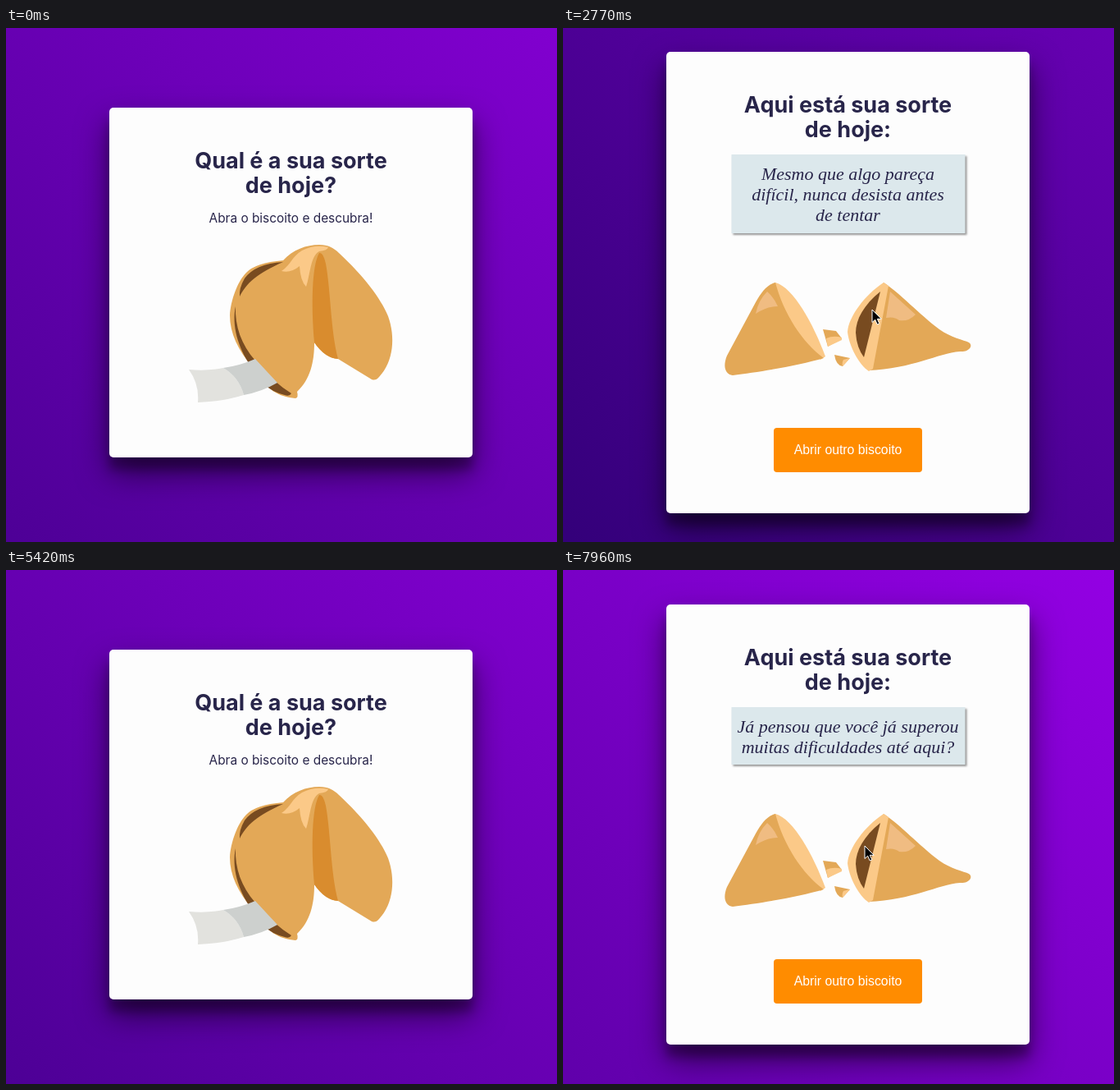
An HTML page that plays this animation: 672 px wide and 626 px high, repeating every 8 s.

```html
<!DOCTYPE html>
<html lang="pt-BR">
<head>
<meta charset="utf-8">
<title>Biscoito da sorte</title>
<style>
  html, body { margin: 0; width: 100%; height: 100%; overflow: hidden; }
  #stage { position: relative; width: 672px; height: 626px; overflow: hidden; }
  #card {
    position: absolute; left: 126px; width: 443px; border-radius: 5px; background: #fdfdfd;
    box-shadow: 0 19px 38px rgba(0,0,0,.54), 0 15px 12px rgba(0,0,0,.28);
  }
  svg { position: absolute; left: 0; top: 0; }
  text { text-anchor: middle; fill: #28254a; }
  .title { font: 700 27px Inter, sans-serif; }
  .sub { font: 15.4px Inter, sans-serif; }
  .fortune { font: italic 22px "Liberation Serif", serif; }
  .label { font: 15.8px "Liberation Sans", Arial, sans-serif; fill: #fff; }
  #note { fill: #dce8ec; filter: drop-shadow(2px 2px 1px rgba(0,0,0,.4)); }
  .tan { fill: #e3a857; }
  .light { fill: #fbc988; }
  .shine { fill: #f0bc82; }
  .brown { fill: #784b20; }
</style>
</head>
<body>
<div id="stage">
  <div id="card"></div>
  <svg width="672" height="626" viewBox="0 0 672 626">
    <g id="closed">
      <text class="title" x="347.5" y="171">Qual é a sua sorte</text>
      <text class="title" x="347.5" y="201">de hoje?</text>
      <text class="sub" x="347.5" y="237">Abra o biscoito e descubra!</text>
      <g id="cookie">
        <path class="tan" d="M338 283C350 270 366 264 382 264C393 264 400 268 406 274C436 302 457 329 466 351C475 376 473 406 455 425Q451 430 446 428L405 403Q389 402 376 383C376 407 371 428 355 443Q357 450 353 451C333 449 318 442 301 413C283 393 273 371 273 350C274 332 282 309 293 298Q304 286 338 283Z"/>
        <path fill="#d98c2e" d="M382 274C373 289 372 338 376 383Q389 402 405 403C396 370 396 319 390 287Q387 273 382 274Z"/>
        <path class="light" d="M336 296C348 288 348 279 361 271Q377 263 393 267Q392 271 382 272C371 278 371 301 366 315Q359 308 358 290Q347 299 336 296Z"/>
        <path class="brown" d="M338 285Q304 287 291 305Q284 317 285 327C293 311 306 299 338 285Z"/>
        <path class="brown" d="M280 339C275 362 283 389 298 411L304 405C287 386 279 363 280 339Z"/>
        <path class="brown" d="M315 434L328 430Q338 439 348 445Q346 449 340 447Q324 443 315 434Z"/>
        <path fill="#e2e2de" d="M223 416Q246 418 265 414Q284 425 290 447Q264 455 234 456Q236 434 223 416Z"/>
        <path fill="#cdd0ce" d="M265 414Q286 411 304 403Q315 415 331 432Q312 443 290 447Q284 425 265 414Z"/>
      </g>
    </g>
    <g id="open">
      <text class="title" x="347.5" y="103">Aqui está sua sorte</text>
      <text class="title" x="347.5" y="133">de hoje:</text>
      <rect id="note" x="205.5" y="154" width="285" height="96"/>
      <g id="fortune"></g>
      <g id="lower">
        <path class="light" d="M259 310C281 316 305 360 320 400L314 404C284 380 262 342 255 312Z"/>
        <path class="tan" d="M259 310C248 313 242 322 235 334L200 399C195 411 197 422 207 423C240 419 288 411 318 402C292 383 269 348 259 310Z"/>
        <path class="shine" d="M249 321Q257 328 262 339Q248 339 235 348Q238 332 249 321Z"/>
        <path class="tan" d="M317 367L333 369L340 378L323 388Z"/>
        <path class="light" d="M321 378Q330 374 340 377V380L323 388Z"/>
        <path class="tan" d="M331 398L350 402L341 412Q333 411 331 398Z"/>
        <path class="light" d="M342 404L350 402L341 412Q340 407 342 404Z"/>
        <path class="tan" d="M391 310C411 323 435 349 459 367C473 377 489 380 495 383C501 387 495 395 484 394C457 396 427 415 372 417Z"/>
        <path class="light" d="M391 310C368 325 348 352 347 370C349 388 361 410 373 418L378 415L397 314Z"/>
        <path class="brown" d="M387 321C367 337 357 355 357 371Q358 389 367 401Z"/>
        <path class="shine" d="M399 321L430 349Q421 358 410 356Q404 351 394 353Z"/>
        <rect x="257" y="487" width="181" height="54" rx="4" fill="#ff8c00"/>
        <text class="label" x="347.5" y="519">Abrir outro biscoito</text>
      </g>
    </g>
    <g id="cursor" stroke-linejoin="round">
      <path id="arrow" fill="#000" stroke="#fff" d="M0 0V15.5L3.7 12.2L6.2 18L8.8 16.9L6.3 11.3H11.2Z"/>
      <path id="hand" fill="#fff" stroke="#000" d="M2 1Q4-1 5 2L6 7Q8 5 9 7Q11 6 11.5 8Q14 7 13.5 11Q14 14 12 17H5.5Q4 13 .5 10.5Q.5 8 3.5 9.5Z"/>
    </g>
  </svg>
</div>
<script>
const $ = id => document.getElementById(id);
const LOOP = 8000, CENTER_Y = 310;

const fortunes = [
  { from: 1980, to: 4480, lines: ["Mesmo que algo pareça", "difícil, nunca desista antes", "de tentar"] },
  { from: 7300, to: LOOP, lines: ["Já pensou que você já superou", "muitas dificuldades até aqui?"] }
];

// Pointer visits: [time, x, y]
const visits = [
  [[850, 680, 570], [1450, 377, 343], [2900, 377, 343], [3600, 354, 510],
   [3900, 354, 519], [4800, 354, 519], [5150, 360, 640]],
  [[5950, 680, 600], [6380, 488, 491], [6900, 368, 336], [LOOP, 368, 336]]
];

// CSS "ease": cubic-bezier(.25, .1, .25, 1)
function ease(x) {
  let lo = 0, hi = 1;
  for (let i = 0; i < 24; i++) {
    const u = (lo + hi) / 2;
    if (.75 * u * (1 - u) + u ** 3 < x) lo = u; else hi = u;
  }
  const u = lo, v = 1 - u;
  return .3 * u * v * v + 3 * u * u * v + u ** 3;
}

function pointerAt(t) {
  const path = visits.find(p => t >= p[0][0] && t <= p[p.length - 1][0]);
  if (!path) return null;
  const i = Math.max(1, path.findIndex(p => p[0] >= t));
  const [a, b] = [path[i - 1], path[i]];
  const k = (t - a[0]) / (b[0] - a[0]), s = k * k * (3 - 2 * k);
  return { x: a[1] + (b[1] - a[1]) * s, y: a[2] + (b[2] - a[2]) * s };
}

const show = (id, on) => $(id).style.display = on ? "" : "none";
const inside = (p, x1, y1, x2, y2) => p && p.x > x1 && p.x < x2 && p.y > y1 && p.y < y2;

// A large diagonal gradient slides back and forth, 5 s each way
function drawBackground(t) {
  const level = t < 3750 ? ease((t + 1250) / 5000) : 1 - ease((t - 3750) / 5000);
  const from = -820 + 815 * level;
  $("stage").style.background =
    `linear-gradient(45deg, rgb(50,0,120) ${from}px, rgb(148,0,228) ${from + 1735}px)`;
}

let shown = null;
function drawFortune(fortune) {
  if (fortune === shown) return;
  shown = fortune;
  const extra = fortune ? (fortune.lines.length - 3) * 26 : 0;
  const height = fortune ? 562 + extra : 426;
  $("card").style.top = CENTER_Y - height / 2 + "px";
  $("card").style.height = height + "px";
  show("closed", !fortune);
  show("open", fortune);
  if (!fortune) return;
  $("open").setAttribute("transform", `translate(0 ${-extra / 2})`);
  $("lower").setAttribute("transform", `translate(0 ${extra})`);
  $("note").setAttribute("height", 96 + extra);
  $("fortune").innerHTML = fortune.lines
    .map((line, i) => `<text class="fortune" x="347.5" y="${185 + i * 25}">${line}</text>`).join("");
}

function draw(t) {
  drawBackground(t);
  const fortune = fortunes.find(f => t >= f.from && t < f.to) || null;
  drawFortune(fortune);

  const p = pointerAt(t);
  const overCookie = !fortune && inside(p, 272, 264, 472, 452);
  const overButton = fortune && inside(p, 257, 487, 438, 541);
  const shake = overCookie ? Math.round(1.2 * Math.cos((t - 1580) * Math.PI / 125 + Math.PI)) : 0;
  $("cookie").setAttribute("transform", `translate(${shake} 0)`);

  show("cursor", p);
  if (p) $("cursor").setAttribute("transform", `translate(${p.x} ${p.y})`);
  show("hand", overCookie || overButton);
  show("arrow", !(overCookie || overButton));
}

drawFortune(fortunes[0]);
const start = performance.now();
(function tick() {
  draw((performance.now() - start) % LOOP);
  requestAnimationFrame(tick);
})();
</script>
</body>
</html>
```
